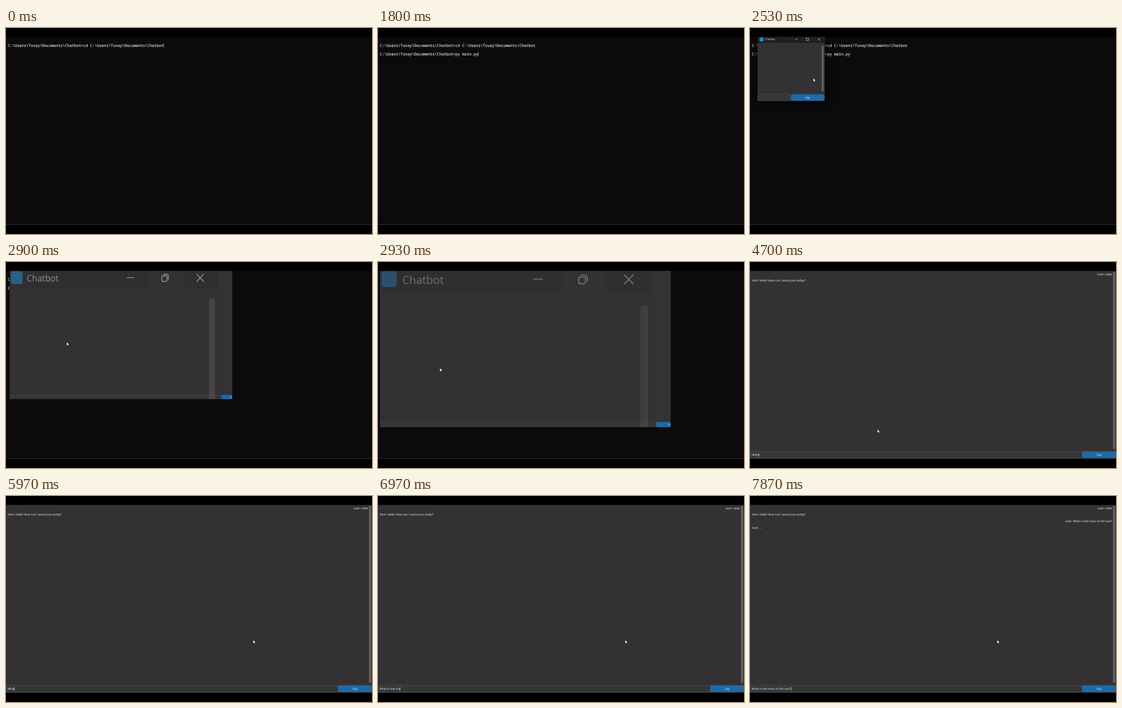
An HTML page with a canvas for the animation above (8000 ms loop, 600 by 338 pixels).

```html
<!DOCTYPE html>
<html lang="en">
<head>
<meta charset="utf-8">
<title>Chatbot demo</title>
<style>
  html, body { margin: 0; width: 100%; height: 100%; overflow: hidden; background: #000; }
  canvas { display: block; width: 600px; height: 338px; }
</style>
</head>
<body>
<canvas id="stage"></canvas>
<script>
const W = 600, H = 338, LOOP = 8000, FPS = 30;
const canvas = document.getElementById('stage');
const ctx = canvas.getContext('2d');
const dpr = window.devicePixelRatio || 1;
canvas.width = W * dpr;
canvas.height = H * dpr;

const MONO = '6.25px "Noto Sans Mono", monospace';
const UI = '5px Roboto, sans-serif';
const TITLE = '"Open Sans", sans-serif';
const CHAR = 3.75;
const FOLDER = 'C:\\Users\\Tuvay\\Documents\\Chatbot';
const PROMPT = FOLDER + '>';
const COMMAND = 'py main.py';
const QUESTION = 'What is the mass of the sun?';
const BOT = 'Vorit: ';

const BODY = '#333133', BLUE = '#1f6aa5', ICON = '#2489cc';

const commandKeys = [700, 800, 900, 1000, 1130, 1270, 1470, 1630, 1770, 1800];
const entryKeys = [
  [3530, 'H'], [3600, 'He'], [3700, 'Hel'], [3770, 'Hell'], [3870, 'Hello'],
  [4970, 'Hell'], [5070, 'Hel'], [5130, 'He'], [5230, 'H'], [5300, ''],
  [5700, 'W'], [5830, 'WH'], [5970, 'WHa'], [6100, 'WH'], [6170, 'W'],
  [6270, 'Wh'], [6330, 'Wha'], [6400, 'What'], [6470, 'What ']
];
const growth = [[2830, 0], [2870, 0.25], [2900, 0.52], [2930, 0.748], [2970, 0.95], [3000, 1]];
const mouseToEntry = [
  [2370, 121, 142], [2530, 103.8, 82.6], [2700, 94.5, 18], [2820, 94.5, 18],
  [2930, 101.6, 174.3], [3030, 109, 258], [3170, 117, 316], [4270, 117, 316]
];
const mouseToRest = [
  [4470, 181, 292], [4530, 182, 279], [4670, 182, 279],
  [4930, 417, 243], [5270, 405.3, 236.6], [8000, 405.3, 236.6]
];

const lerp = (a, b, p) => a + (b - a) * p;

// Values between timed keys; each key is [time, value, ...]
function along(keys, t) {
  if (t <= keys[0][0]) return keys[0].slice(1);
  const i = keys.findIndex(k => k[0] > t);
  if (i < 0) return keys[keys.length - 1].slice(1);
  const a = keys[i - 1], b = keys[i], p = (t - a[0]) / (b[0] - a[0]);
  return a.slice(1).map((v, n) => lerp(v, b[n + 1], p));
}

function rect(x, y, w, h, fill, r = 0, stroke) {
  ctx.beginPath();
  ctx.roundRect(x, y, w, h, r);
  ctx.fillStyle = fill;
  ctx.fill();
  if (stroke) {
    ctx.strokeStyle = stroke;
    ctx.lineWidth = 0.6;
    ctx.stroke();
  }
}

function text(s, x, y, font, fill, align = 'left') {
  ctx.font = font;
  ctx.fillStyle = fill;
  ctx.textAlign = align;
  ctx.fillText(s, x, y);
}

// Terminal text, slightly thickened
function code(s, x, y) {
  text(s, x, y, MONO, '#cccccc');
  ctx.strokeStyle = '#cccccc';
  ctx.lineWidth = 0.22;
  ctx.strokeText(s, x, y);
}

function line(points, color, width) {
  ctx.beginPath();
  points.forEach(([x, y], i) => i && i % 2 ? ctx.lineTo(x, y) : ctx.moveTo(x, y));
  ctx.strokeStyle = color;
  ctx.lineWidth = width;
  ctx.stroke();
}

function closeMark(x, y, r, width) {
  line([[x - r, y - r], [x + r, y + r], [x - r, y + r], [x + r, y - r]], '#e0e0e0', width);
}

function terminal(t) {
  rect(0, 14.5, W, 308, '#0c0a0d');
  rect(0, 322, W, 0.8, '#3a3c38');
  code(PROMPT + 'cd ' + FOLDER, 3, 30.9);
  let x = 3 + (PROMPT.length + 3 + FOLDER.length) * CHAR, y = 25;
  if (t >= 300) {
    const typed = COMMAND.slice(0, commandKeys.filter(k => k <= t).length);
    code(PROMPT + typed, 3, 45.3);
    x = 3 + (PROMPT.length + typed.length) * CHAR;
    y = 39.5;
  }
  if (t >= 2000) { x = 3; y = 46.8; }
  if (t < 2170) rect(x, y, 0.6, 7, '#cccccc');
}

function sayButton(x, y, w, h) {
  rect(x, y, w, h, BLUE, 2.2);
  text('Say', x + w / 2, y + h / 2 + 1.8, UI, '#dce4ee', 'center');
}

function smallWindow(t) {
  const p = Math.min(1, (t - 2140) / 190);
  const s = lerp(0.9, 1, p);
  ctx.save();
  ctx.globalAlpha = p;
  ctx.translate(67.5, 67);
  ctx.scale(s, s);
  ctx.translate(-67.5, -67);
  ctx.shadowColor = 'rgba(0,0,0,0.7)';
  ctx.shadowBlur = 14 * dpr;
  ctx.shadowOffsetY = 4 * dpr;
  rect(12.5, 12, 110, 107.8, '#242324', 2);
  ctx.shadowColor = 'transparent';
  rect(12.5, 12, 110, 12.6, '#201e20', [2, 2, 0, 0]);
  rect(12.5, 24.6, 110, 84, BODY);
  rect(15.8, 15.7, 6.2, 6.2, ICON, 1.2);
  text('Chatbot', 24, 20.4, '4.6px ' + TITLE, '#e8e8e8');
  if (t >= 2660) rect(85.3, 14, 18.4, 10.4, '#343234');
  line([[74.2, 18.7], [78, 18.7]], '#e0e0e0', 0.6);
  ctx.strokeRect(92.6, 16.9, 3.6, 3.6);
  closeMark(112.8, 18.7, 1.8, 0.6);
  rect(117.6, 28.5, 3, 75.7, '#696769', 1.5);
  rect(12.8, 108.8, 54.2, 10.4, '#343638', 2, '#565b5e');
  sayButton(67.2, 108.6, 55, 10.8);
  ctx.restore();
}

function restoreMark(x, y) {
  ctx.beginPath();
  ctx.roundRect(x, y + 3, 11, 11, 2.5);
  ctx.moveTo(x + 3, y);
  ctx.lineTo(x + 10, y);
  ctx.quadraticCurveTo(x + 14, y, x + 14, y + 4);
  ctx.lineTo(x + 14, y + 11);
  ctx.strokeStyle = '#e0e0e0';
  ctx.lineWidth = 1.7;
  ctx.stroke();
}

function growingWindow(t) {
  const [p] = along(growth, t);
  const x = lerp(12.5, 0, p), y = 14.5;
  const w = lerp(110, 600, p), h = lerp(105.5, 307.5, p);
  ctx.save();
  ctx.translate(x, y);
  ctx.scale(w / 476, h / 256);
  ctx.translate(-3.5, -14.5);
  rect(3.5, 14.5, 476, 256, BODY);
  rect(3.5, 14.5, 445.5, 37, '#302e30');
  rect(301, 14.5, 73, 37, '#333133');
  rect(449, 14.5, 30.5, 248, '#343234');
  rect(3.5, 262, 453, 8.5, '#353839');
  rect(3.5, 261.8, 453, 0.7, '#484c4e');
  rect(456, 262, 23.5, 8.5, BLUE, 2);
  rect(476.2, 264.8, 1.6, 3, '#9dbad6');
  // Stretched picture of the small window, fading away
  ctx.globalAlpha = 1 - 0.84 * p;
  rect(6, 15, 25, 26, ICON, 5);
  text('Chatbot', 40, 35.5, '18.3px ' + TITLE, '#e0e0e0');
  line([[254, 28], [270, 28]], '#e0e0e0', 1.6);
  restoreMark(329, 21.5);
  closeMark(411, 28.5, 7.8, 1.8);
  ctx.globalAlpha *= 0.65;
  rect(430, 70, 13, 200, '#696769', [6, 6, 0, 0]);
  ctx.restore();
}

function entryText(t) {
  if (t >= 7370) return QUESTION.slice(0, 23 + Math.floor((t - 7370) / 60));
  if (t >= 6530) return QUESTION.slice(0, 6 + Math.floor((t - 6530) / 50));
  const done = entryKeys.filter(k => k[0] <= t);
  return done.length ? done[done.length - 1][1] : '';
}

function chat(t) {
  rect(0, 14.5, W, 307.5, BODY);
  rect(595.2, 16, 3.2, 291, '#696769', 1.6);
  rect(0.3, 310.9, 544.5, 10.6, '#343638', 2, '#565b5e');
  sayButton(544.6, 310.6, 55.4, 11.2);

  const say = (s, row, right) =>
    text(s, right ? 593.7 : 2.5, 21.5 + row * 10.95, UI, '#dce0e2', right ? 'right' : 'left');
  if (t >= 4030) {
    say('User: Hello', 0, true);
    say(BOT + (t < 4670 ? '...' : 'Hello! How can I assist you today?'), 1);
  }
  if (t >= 7870) {
    say('User: ' + QUESTION, 2, true);
    say(BOT + '...', 3);
  }

  const typed = entryText(t);
  text(typed, 2.5, 317.9, UI, '#dce4ee');
  const blinkOff = t >= 5470 && t < 5700;
  if (t >= 3200 && !blinkOff) {
    rect(2.5 + ctx.measureText(typed).width, 313.4, 0.7, 5.8, '#dce4ee');
  }
}

function arrow(x, y) {
  ctx.beginPath();
  [[0, 0], [0, 5], [1.2, 4], [2, 5.7], [2.8, 5.3], [2, 3.7], [3.5, 3.6]]
    .forEach(([dx, dy]) => ctx.lineTo(x + dx, y + dy));
  ctx.closePath();
  ctx.strokeStyle = '#111';
  ctx.lineWidth = 0.5;
  ctx.stroke();
  ctx.fillStyle = '#fff';
  ctx.fill();
}

function beam(x, y) {
  line([[x, y - 2.6], [x, y + 2.6], [x - 1, y - 2.6], [x + 1, y - 2.6],
    [x - 1, y + 2.6], [x + 1, y + 2.6]], '#c4c6c8', 0.6);
}

function mouse(t) {
  if (t < 2370 || (t >= 4270 && t < 4470)) return;
  const [x, y] = along(t < 4270 ? mouseToEntry : mouseToRest, t);
  (y > 309 ? beam : arrow)(x, y);
}

function draw(t) {
  ctx.setTransform(dpr, 0, 0, dpr, 0, 0);
  ctx.textRendering = 'geometricPrecision';
  rect(0, 0, W, H, '#000');
  ctx.save();
  ctx.beginPath();
  ctx.rect(0, 14.5, W, 308.5);
  ctx.clip();
  terminal(t);
  if (t >= 3000) chat(t);
  else if (t >= 2860) growingWindow(t);
  else if (t >= 2160) smallWindow(t);
  mouse(t);
  ctx.restore();
}

function tick() {
  const t = performance.now() % LOOP;
  // Step at the recording's frame rate, on whole hundredths of a second
  const step = Math.floor((t + 4) * FPS / 1000);
  draw(Math.round(step * 100 / FPS) * 10);
  requestAnimationFrame(tick);
}
tick();
</script>
</body>
</html>
```
